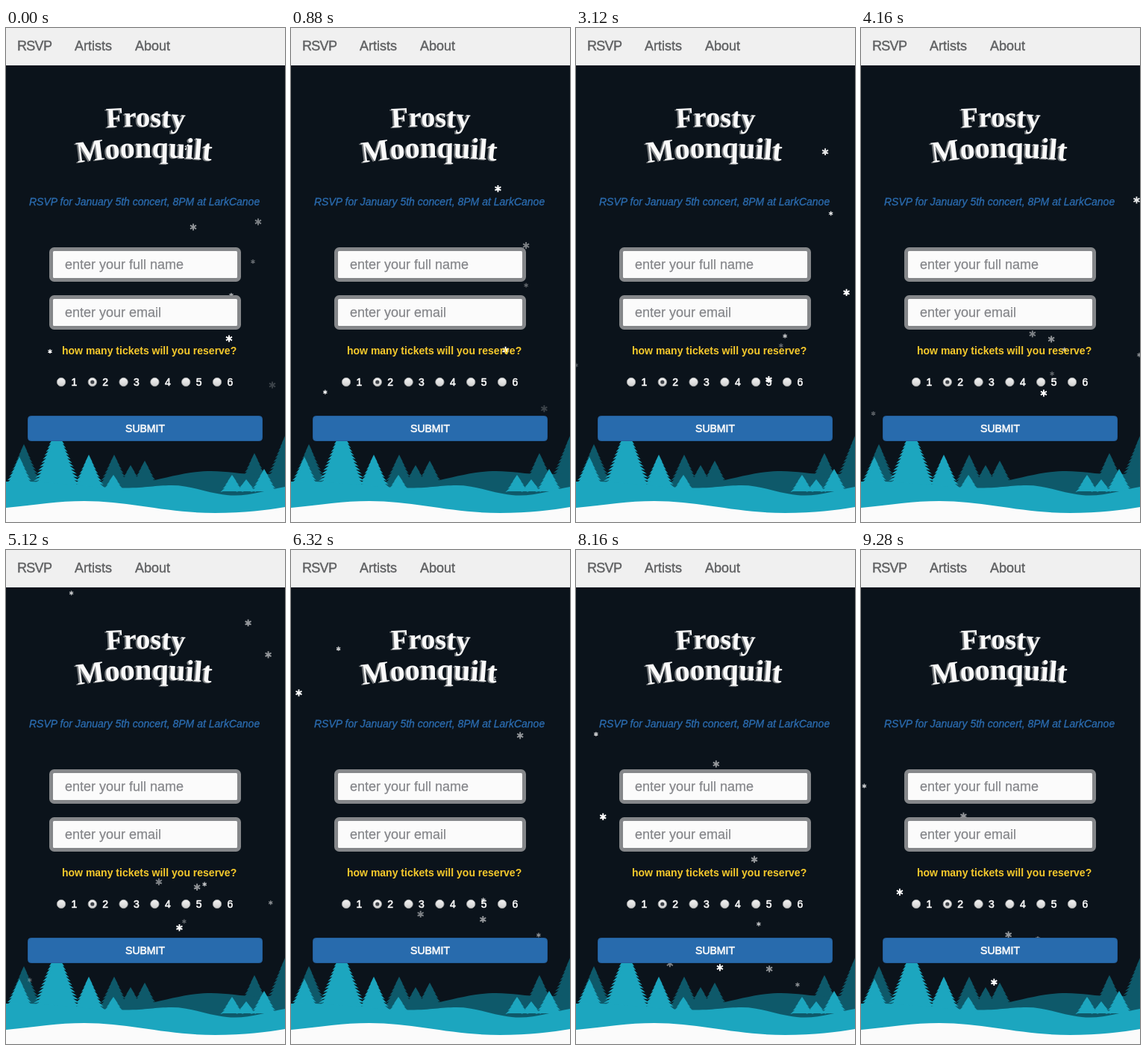
An HTML page for the animation above (9360 ms loop, 374 by 660 pixels).

```html
<!DOCTYPE html>
<html lang="en">
<head>
<meta charset="utf-8">
<title>Concert RSVP</title>
<style>
  html, body { margin: 0; width: 100%; height: 100%; overflow: hidden; background: #0b131b; }
  svg { display: block; width: 100%; height: 100%; font: 14px "Liberation Sans", Arial, sans-serif; }
  .nav { font-size: 18px; fill: #5f6062; stroke: #5f6062; stroke-width: .4; }
  .title { font-family: "Liberation Serif", serif; font-weight: bold; fill: #fafafa;
           filter: drop-shadow(-1.5px 1.5px 0 #777b7e); }
  .details { font-style: italic; fill: #2b6cb0; stroke: #2b6cb0; stroke-width: .3; }
  .field { fill: #fbfbfb; stroke: #85878a; stroke-width: 5; }
  .hint { font-size: 18px; fill: #85868a; stroke: #85868a; stroke-width: .25; }
  .white { fill: #fafafa; stroke: #fafafa; stroke-width: .6; }
  #flakes { stroke: #fff; }
</style>
</head>
<body>
<svg viewBox="0 0 374 660">
  <defs>
    <path id="arcTop" d="M135 133 Q190 129 260 136"/>
    <path id="arcBottom" d="M96 180 Q185 166 290 179"/>
    <linearGradient id="knob" x2="0" y2="1">
      <stop stop-color="#f4f4f4"/><stop offset="1" stop-color="#cfcfcf"/>
    </linearGradient>
  </defs>
  <rect width="374" height="660" fill="#0b131b"/>

  <g fill="#0e596a">
    <path id="backTrees"/>
    <path d="M0 606 H190 C220 600 245 592 275 592 S325 600 374 594 V660 H0Z"/>
  </g>
  <g fill="#1ca6bf">
    <path id="frontTrees"/>
    <path d="M0 606 C50 604 95 612 140 614 S195 611 222 611 S268 621 296 624 S350 617 374 613 V660 H0Z"/>
  </g>
  <path fill="#fbfbfb" d="M0 641 C40 637 70 632 105 632 C165 632 215 648 280 648 C320 648 350 644 374 640 V660 H0Z"/>

  <g id="flakes"></g>

  <rect width="374" height="50" fill="#f0f0f0"/>
  <rect y="49" width="374" height="1" fill="#e2e2e2"/>
  <g class="nav">
    <text x="15" y="30" letter-spacing="-.7">RSVP</text>
    <text x="92" y="30">Artists</text>
    <text x="173" y="30">About</text>
  </g>

  <g class="title">
    <text font-size="38"><textPath href="#arcTop">Frosty</textPath></text>
    <text font-size="40"><textPath href="#arcBottom">Moonquilt</textPath></text>
  </g>
  <text class="details" x="31" y="237">RSVP for January 5th concert, 8PM at LarkCanoe</text>

  <rect class="field" x="60.5" y="295.5" width="252" height="41" rx="4"/>
  <text class="hint" x="79" y="322">enter your full name</text>
  <rect class="field" x="60.5" y="359.5" width="252" height="41" rx="4"/>
  <text class="hint" x="79" y="386">enter your email</text>

  <text x="75" y="436" font-weight="bold" fill="#f7ca2c">how many tickets will you reserve?</text>
  <g id="tickets"></g>

  <rect x="29.5" y="518.5" width="314" height="33" rx="4" fill="#286bad" stroke="#235e9b"/>
  <text class="white" x="186.5" y="540" text-anchor="middle">SUBMIT</text>
</svg>
<script>
const LOOP = 9360, STEP = 80, SKY_TOP = 40, GROUND = 589;
const byId = id => document.getElementById(id);

function add(parent, tag, attrs, text = '') {
  const node = document.createElementNS('http://www.w3.org/2000/svg', tag);
  for (const key in attrs) node.setAttribute(key, attrs[key]);
  node.textContent = text;
  return parent.appendChild(node);
}

// Jagged conifer: each tier reaches outward, then tucks back in.
function tree(x, top, base) {
  const height = base - top, halfWidth = 8 + height / 3;
  const tiers = Math.round(height / 5), left = [], right = [];
  for (let i = 1; i <= tiers; i++) {
    const y = top + height * i / tiers;
    const reach = halfWidth * i / tiers, tuck = reach * .76;
    right.push(`${x + reach} ${y}`, `${x + tuck} ${y - 1}`);
    left.unshift(`${x - tuck} ${y - 1}`, `${x - reach} ${y}`);
  }
  return `M${x} ${top}L${right.join('L')}L${left.join('L')}Z`;
}

function plantForest(id, base, tips) {
  byId(id).setAttribute('d', tips.map(([x, top]) => tree(x, top, base)).join(''));
}
plantForest('backTrees', 614, [[24, 556], [145, 570], [167, 584], [186, 578], [333, 568], [374, 545]]);
plantForest('frontTrees', 620, [[18, 573], [68, 532], [111, 570], [144, 597], [303, 597], [322, 603], [346, 589]]);

for (let n = 1; n <= 6; n++) {
  const cx = 32.2 + n * 41.8, cy = 473, group = byId('tickets');
  add(group, 'circle', { cx, cy, r: 5.7, fill: 'url(#knob)', stroke: '#9a9c9e', 'stroke-width': .8 });
  if (n === 2) add(group, 'circle', { cx, cy, r: 2.6, fill: '#3c4046' });
  add(group, 'text', { x: cx + 13.5, y: 478, class: 'white' }, n);
}

// Flakes of a layer fall together; each has a place at time zero and a sideways drift (px/s).
const layers = [
  { fall: 17.5, glow: 1, flakes: [[299, 415, -13], [302, 357, -7]] },
  { fall: 36, glow: .55, flakes: [[251, 266, 1], [452, 287, -19], [338, 259, -26], [331, 312, -18], [357, 477, -20]] },
  { fall: 62, glow: 1, flakes: [[244, 160, 38], [59, 432, -15], [228, -28, 34], [190, -260, -20], [555, -220, -45], [-50, 257, 16]] },
  { fall: 90, glow: 1, flakes: [[-78, -378, 14], [195, -33, 47], [541, -321, -37]] }
];

function flakeShape(radius) {
  let arms = '';
  for (let angle = 0; angle < 360; angle += 60) {
    const a = angle * Math.PI / 180;
    arms += `M0 0L${radius * Math.sin(a)} ${radius * Math.cos(a)}`;
  }
  return arms;
}

// Large and small flakes alternate, and later ones in a layer are fainter.
const flakes = layers.flatMap(({ fall, glow, flakes }) => flakes.map(([x, y, drift], i) => {
  const radius = i % 2 ? 3 : 4.6;
  const node = add(byId('flakes'), 'path', {
    d: flakeShape(radius),
    'stroke-width': radius * .42,
    opacity: glow * (1 - (i / flakes.length) ** 2)
  });
  return { node, x, y, drift, fall };
}));

function draw(now) {
  const seconds = Math.floor(now % LOOP / STEP) * STEP / 1000;
  for (const { node, x, y, drift, fall } of flakes) {
    const height = y + fall * seconds;
    node.setAttribute('transform', `translate(${x + drift * seconds} ${height})`);
    node.setAttribute('visibility', height > SKY_TOP && height < GROUND ? 'visible' : 'hidden');
  }
}

const start = performance.now();
function tick() {
  draw(performance.now() - start);
  requestAnimationFrame(tick);
}
tick();
</script>
</body>
</html>
```
